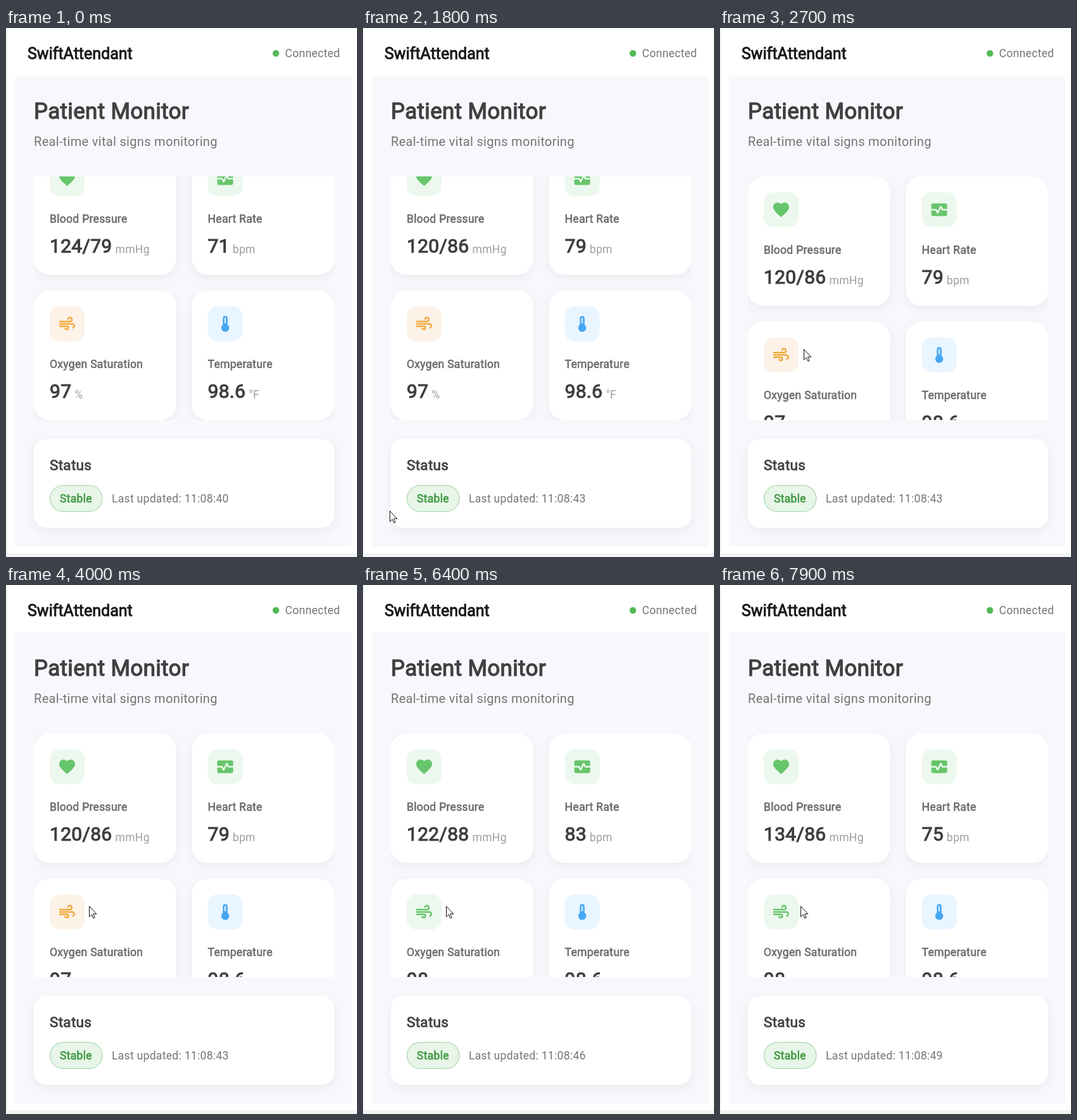
These frames come from a looping animation (554x834 px, 8000 ms). An HTML page:

```html
<!DOCTYPE html>
<html lang="en">
<head>
<meta charset="utf-8">
<title>Patient Monitor</title>
<style>
  html, body { margin: 0; width: 100%; height: 100%; overflow: hidden; background: #fff; }
  svg { display: block; width: 554px; height: 834px; }
  text { font-family: Roboto, "Noto Sans", sans-serif; font-size: 17.5px; letter-spacing: .31px; white-space: pre; }
  /* Synthetic emboldening of the regular weight */
  .bold { stroke: currentColor; fill: currentColor; stroke-width: .036em; }
  .brand { font-size: 25px; letter-spacing: 0; color: #16191b; }
  .title { font-size: 35px; color: #404042; }
  .sub { font-size: 20px; }
  .soft { fill: #757575; }
  .label { color: #6c6c6c; }
  .value { font-size: 30px; color: #3e3e3e; }
  .unit { fill: #9e9e9e; }
  .status { font-size: 22.5px; color: #404042; }
  .stable { color: #3d9940; }
</style>
</head>
<body>
<svg viewBox="0 0 554 834">
  <defs>
    <clipPath id="viewport"><rect x="44" y="234" width="474" height="384"/></clipPath>
    <filter id="shadow" x="-20%" y="-20%" width="140%" height="150%">
      <feDropShadow dx="0" dy="5" stdDeviation="7.8" flood-color="#000" flood-opacity=".05"/>
    </filter>
  </defs>

  <rect width="554" height="834" fill="#fff"/>
  <rect width="2" height="834" fill="#f3f3f3"/>
  <rect y="828" width="554" height="6" fill="#f3f3f3"/>
  <rect x="14" y="75" width="532" height="743" fill="#f7f8fc"/>

  <text class="bold brand" x="34" y="49">SwiftAttendant</text>
  <circle cx="426" cy="40" r="5.2" fill="#52b955"/>
  <text class="soft" x="440.5" y="46">Connected</text>
  <text class="bold title" x="44" y="143">Patient Monitor</text>
  <text class="soft sub" x="44" y="186">Real-time vital signs monitoring</text>

  <g clip-path="url(#viewport)"><g id="grid"></g></g>

  <rect x="44" y="648" width="474" height="140" rx="20" fill="#fff" filter="url(#shadow)"/>
  <text class="bold status" x="69" y="697">Status</text>
  <rect x="69.6" y="721.1" width="82.3" height="41.3" rx="20.6" fill="#e8f5e9" stroke="#a9d9ab" stroke-width="1.25"/>
  <text class="bold stable" x="85" y="748">Stable</text>
  <text class="soft" id="updated" x="167" y="748"></text>

  <path id="cursor" d="M.5 .5V17.2L4.3 13.6 6.9 19.3 9.2 18.3 6.7 12.6H11.9Z" fill="#fff" stroke="#111" stroke-width="1"/>
</svg>

<script>
const LOOP = 8000;
const GREEN = ['#67c56b', '#ecf8ed'];
const ORANGE = ['#f2a93b', '#fdf2e8'];
const BLUE = ['#45a6f2', '#e9f5ff'];

const ICONS = {
  heart: 'M12 21.35l-1.45-1.32C5.4 15.36 2 12.28 2 8.5 2 5.42 4.42 3 7.5 3c1.74 0 3.41.81 4.5 2.09C13.09 3.81 14.76 3 16.5 3 19.58 3 22 5.42 22 8.5c0 3.78-3.4 6.86-8.55 11.54z',
  pulse: 'M15.11 12.45L14 10.24l-3.11 6.21c-.16.34-.51.55-.89.55s-.73-.21-.89-.55L7.38 13H2v5c0 1.1.9 2 2 2h16c1.1 0 2-.9 2-2v-5h-6c-.38 0-.73-.21-.89-.55zM20 4H4c-1.1 0-2 .9-2 2v5h6c.38 0 .73.21.89.55L10 13.76l3.11-6.21c.34-.68 1.45-.68 1.79 0L16.62 11H22V6c0-1.1-.9-2-2-2z',
  air: 'M14.5 17a3 3 0 0 1-6 0h2a1 1 0 1 0 1-1H2v-2h9.5a3 3 0 0 1 3 3zM19 6.5a3.5 3.5 0 0 0-7 0h2a1.5 1.5 0 1 1 1.5 1.5H2v2h13.5A3.5 3.5 0 0 0 19 6.5zM18.5 11H2v2h16.5a1.5 1.5 0 0 1 0 3v2a3.5 3.5 0 0 0 0-7z',
  thermometer: 'M15 13V5a3 3 0 0 0-6 0v8a5 5 0 1 0 6 0zm-4-8a1 1 0 0 1 2 0h-1v1h1v2h-1v1h1v2h-2z'
};

const CARDS = [
  ['heart', 'Blood Pressure', 'mmHg', GREEN],
  ['pulse', 'Heart Rate', 'bpm', GREEN],
  ['air', 'Oxygen Saturation', '%', ORANGE],
  ['thermometer', 'Temperature', '°F', BLUE]
];

const READINGS = [
  { at: 0, second: 40, values: ['124/79', '71', '97', '98.6'] },
  { at: 1400, second: 43, values: ['120/86', '79', '97', '98.6'] },
  { at: 4400, second: 46, values: ['122/88', '83', '98', '98.6'] },
  { at: 7400, second: 49, values: ['134/86', '75', '98', '98.6'] }
];

// Pointer keys: time, x, y
const POINTER = [
  [700, 43, 803], [1000, 42, 804], [1700, 42, 761], [1900, 42, 761],
  [2500, 132, 506], [3000, 132, 506], [3100, 131, 506],
  [7000, 131, 506], [7400, 127, 506], [LOOP, 127, 506]
];

const byId = id => document.getElementById(id);
const grid = byId('grid'), updated = byId('updated'), cursor = byId('cursor');

grid.innerHTML = CARDS.map(([icon, label, unit], i) => `
  <g transform="translate(${44 + i % 2 * 249.5} ${234 + (i >> 1) * 229})">
    <rect width="224.5" height="204" rx="25" fill="#fff" filter="url(#shadow)"/>
    <rect class="tile" x="25" y="25" width="55" height="55" rx="15"/>
    <path class="icon" transform="translate(37.5 37.5) scale(1.25)" d="${ICONS[icon]}"/>
    <text class="bold label" x="25" y="122">${label}</text>
    <text x="25" y="169"><tspan class="bold value"></tspan><tspan class="unit" dx="5" dy="1.2">${unit}</tspan></text>
  </g>`).join('');

const parts = [...grid.children].map(card => ({
  tile: card.querySelector('.tile'),
  icon: card.querySelector('.icon'),
  value: card.querySelector('.value')
}));

const ease = p => p * p * (3 - 2 * p);

function pointerAt(t) {
  const next = POINTER.findIndex(key => key[0] > t);
  const [t0, x0, y0] = POINTER[next - 1], [t1, x1, y1] = POINTER[next];
  const p = ease((t - t0) / (t1 - t0));
  return [x0 + (x1 - x0) * p, y0 + (y1 - y0) * p].map(Math.round);
}

let shown;
function showReading(reading) {
  if (reading === shown) return;
  shown = reading;
  updated.textContent = 'Last updated: 11:08:' + reading.second;
  parts.forEach((part, i) => {
    const healthyOxygen = i === 2 && +reading.values[i] >= 98;
    const [ink, tint] = healthyOxygen ? GREEN : CARDS[i][3];
    part.icon.setAttribute('fill', ink);
    part.tile.setAttribute('fill', tint);
    part.value.textContent = reading.values[i];
  });
}

function render(t) {
  showReading(READINGS.filter(r => r.at <= t).pop());
  grid.setAttribute('transform', `translate(0 ${t < 2700 ? -49 : 0})`);
  const visible = t >= POINTER[0][0];
  cursor.setAttribute('visibility', visible ? 'visible' : 'hidden');
  if (visible) cursor.setAttribute('transform', `translate(${pointerAt(t)})`);
}

const start = performance.now();
function tick() {
  render((performance.now() - start) % LOOP);
  requestAnimationFrame(tick);
}
tick();
</script>
</body>
</html>
```
